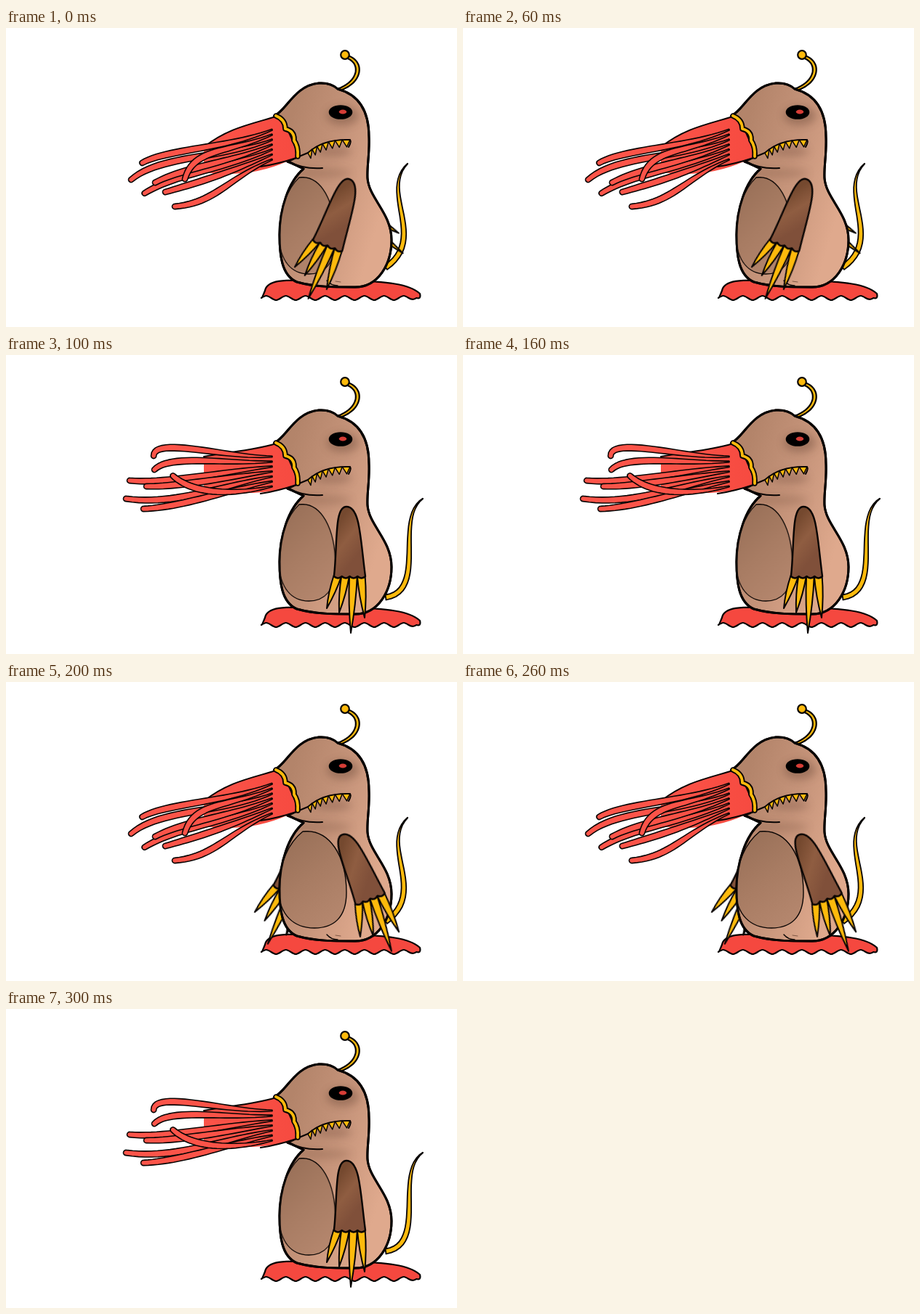
Write an HTML page that moves like this. It is 620 px wide and 412 px high and loops after 400 ms.

```html
<!DOCTYPE html>
<html lang="en">
<head>
<meta charset="utf-8">
<title>Tentacled creature</title>
<style>
  html, body { margin: 0; width: 100%; height: 100%; overflow: hidden; background: #fff; }
  svg { display: block; width: 620px; height: 412px; }
</style>
</head>
<body>
<svg id="stage" viewBox="0 0 620 412" stroke-linejoin="round" stroke-linecap="round"></svg>
<script>
const STEP = 100;
const INK = "#080403", GOLD = "#fdba0c";

const lerp = (a, b, t) => a + (b - a) * t;
const range = n => [...Array(n).keys()];
const path = (d, fill, width = 2, stroke = INK) =>
  `<path d="${d}" fill="${fill}" stroke="${stroke}" stroke-width="${width}"/>`;
const line = (d, width = 1.6, stroke = INK) => path(d, "none", width, stroke);

// Point on a cubic Bézier curve.
function bezier(curve, t) {
  const s = 1 - t, weights = [s * s * s, 3 * s * s * t, 3 * s * t * t, t * t * t];
  return [0, 1].map(k => weights.reduce((sum, w, i) => sum + w * curve[i][k], 0));
}

// Closed outline around a curve; half-width runs from a to b with a bulge between.
function tube(curve, fill, a, b, bulge, width = 1.8) {
  const n = 24;
  const side = sign => range(n + 1).map(i => {
    const t = i / n, [x, y] = bezier(curve, t);
    const [px, py] = bezier(curve, t - 0.01), [qx, qy] = bezier(curve, t + 0.01);
    const w = sign * (lerp(a, b, t) + bulge * Math.sin(Math.PI * t)) / Math.hypot(qx - px, qy - py);
    return [x - (qy - py) * w, y + (qx - px) * w].map(v => v.toFixed(1));
  });
  const start = side(1), back = side(-1).reverse();
  return path(`M${start.join("L")}L${back.join("L")}A${a},${a} 0 0 0 ${start[0]}Z`, fill, width);
}

const shade = (cx, cy, rx, ry, color, opacity) =>
  `<ellipse cx="${cx}" cy="${cy}" rx="${rx}" ry="${ry}" fill="${color}" opacity="${opacity}" filter="url(#soft)"/>`;
const gradient = (id, x1, y1, x2, y2, ...colors) =>
  `<linearGradient id="${id}" gradientUnits="userSpaceOnUse" x1="${x1}" y1="${y1}" x2="${x2}" y2="${y2}">` +
  colors.map((c, i) => `<stop offset="${i / (colors.length - 1)}" stop-color="${c}"/>`).join("") + "</linearGradient>";

// Pattern holds one digit per step: 1 shows the group.
const when = (pattern, ...parts) => `<g data-show="${pattern}">${parts.join("")}</g>`;

const bodyShape = `M369,121C386,113 397,79 430,76C445,75 452,80 456,84C486,92 499,116 499,150
  C500,175 496,190 497,207C499,235 530,255 530,292C530,325 512,357 480,357
  C450,357 425,357 400,350C378,341 376,310 376,285C376,250 388,212 409,194
  C400,190 395,187 387,184L402,177 384,135Z`;

const defs = `<defs>
  ${gradient("skin", 375, 180, 525, 225, "#b3846a", "#c6947a", "#dfa98d")}
  ${gradient("pouch", 380, 220, 460, 320, "#997058", "#a87c63", "#b4866d")}
  ${gradient("sleeve", -18, 20, 20, 50, "#75492f", "#8f5d41", "#80503a")}
  ${gradient("flesh", 165, 0, 402, 0, "#fd554a", "#fb5348", "#f64a40")}
  <filter id="soft" x="-60%" y="-200%" width="220%" height="500%"><feGaussianBlur stdDeviation="6"/></filter>
  <clipPath id="inside"><path d="${bodyShape}"/></clipPath>
</defs>`;

const ripples = range(16).map(i => `S${560 - 13.5 * i},${i % 2 ? 368 : 376} ${553.5 - 13.5 * i},372`).join("");
const puddle = path(`M356,362C360,342 400,349 450,348C530,348 556,354 569,366
  Q571,374 564,372${ripples}Q352,372 356,362Z`, "#f5483f", 2.2);

const tail = curve => tube(curve, GOLD, 0.3, 3.5, 1);
const tailIn = tail([[552, 187], [513, 225], [580, 290], [522, 330]]);
const tailOut = tail([[573, 198], [533, 225], [580, 325], [522, 334]]);

const antenna = tube([[457, 85], [488, 75], [492, 46], [467, 39]], GOLD, 1.5, 1.8, 0.8, 2.2)
  + `<circle cx="466" cy="37" r="5.8" fill="${GOLD}" stroke="${INK}" stroke-width="2.2"/>`;

// One arm, hanging straight down from the shoulder at the local origin.
const CLAW_TIPS = [[-30, 134], [-13, 140], [3, 168], [22, 147]];
const CUFF = 10.75;
const claw = ([tx, ty], i) => {
  const left = CUFF * (i - 1.9), right = left + CUFF, lean = (tx - (left + right) / 2) / 2, bend = lerp(89, ty, 0.5);
  return path(`M${left},89Q${left + lean},${bend} ${tx},${ty}Q${right + lean},${bend} ${right},89Z`, GOLD);
};
const armShape = CLAW_TIPS.map(claw).join("")
  + path(`M-20,89C-15,45 -20,-6 -3,-6C16,-6 16,38 23,90${`q${-CUFF / 2},5 ${-CUFF},0`.repeat(4)}Z`, "url(#sleeve)", 2.4);
const arm = (x, y, angle) => `<g transform="translate(${x} ${y}) rotate(${angle})">${armShape}</g>`;

const body = path(bodyShape, "url(#skin)", 3)
  + `<g clip-path="url(#inside)">
    ${shade(463, 121, 22, 13, "#664435", 0.4)}
    ${shade(450, 170, 25, 6, "#74503f", 0.4)}
    ${shade(435, 200, 40, 6, "#79523f", 0.3)}
  </g>`;

const pouchShape = path(`M408,206C445,202 468,240 468,290C468,325 450,339 424,339
  C396,339 376,322 374,285Q378,230 408,206Z`, "url(#pouch)", 1.4);
const pouch = squeeze => `<g clip-path="url(#inside)">
  <g transform="translate(378 0) scale(${squeeze} 1) translate(-378 0)">${pouchShape}</g></g>`;
const outline = line(bodyShape, 3);
const crease = line("M441,348Q447,355 456,355", 1.4) + line("M453,349L460,350", 1, "#7d5745");

const mouth = [[415, 172], [428, 160], [447, 153], [473, 154]];
const TEETH = 7;
const teeth = range(TEETH).map(i => {
  const [a, tip, b] = [0, 0.5, 1].map(k => bezier(mouth, (i + k) / TEETH));
  return path(`M${a}L${tip[0] + 1},${tip[1] + 10} ${b}`, GOLD, 1.5);
}).join("");
const face = line("M387,184Q410,195 435,193", 2) + line("M403,177L415,172", 2) + teeth
  + line(`M${mouth[0]}C${mouth.slice(1).join(" ")}Q475,157 471,164`, 2)
  + `<ellipse cx="460" cy="116" rx="16.3" ry="9.8" fill="#000"/>`
  + `<ellipse cx="463" cy="115.5" rx="5.2" ry="3" fill="#d63d36"/>`;

// Tentacles run from a tip, past a bend and a shared hub, to evenly spaced roots.
// The shorter ones lie on top.
function beard({ brow, hub, ends }) {
  const [top, bottom] = hub;
  const edge = `M371,122C335,133 305,${brow} 272,${top - 2}`;
  const curves = ends.map(([tip, bend], i) => {
    const u = i / (ends.length - 1);
    return [tip, bend, [305, lerp(top, bottom, u)], [366, lerp(140, 181, u)]];
  });
  return path(`${edge}L272,${bottom - 8}Q335,${bottom} 386,184L402,177 384,135Z`, "url(#flesh)", 0)
    + line(edge, 2) + line("M350,191Q372,188 402,178", 2)
    + curves.sort((a, b) => a[0][0] - b[0][0]).map(c => tube(c, "url(#flesh)", 3.6, 0.8, 2, 1.6)).join("");
}
const droop = beard({
  brow: 138, hub: [166, 207],
  ends: [[[187, 186], [220, 167]], [[246, 208], [258, 165]], [[172, 209], [212, 174]], [[205, 213], [245, 192]],
    [[190, 228], [236, 199]], [[219, 226], [268, 212]], [[232, 246], [288, 241]]],
});
const spread = beard({
  brow: 133, hub: [142, 195],
  ends: [[[203, 139], [203, 112]], [[204, 158], [225, 136]], [[170, 173], [225, 178]], [[193, 181], [235, 182]],
    [[165, 198], [235, 208]], [[189, 212], [240, 210]], [[229, 166], [255, 190]]],
});

const collarLine = "M371,121Q384,126 384,139Q397,142 396,155Q402,163 401,177";
const collar = line(collarLine, 7.5) + line(collarLine, 3.8, GOLD);

const stage = document.getElementById("stage");
stage.innerHTML = [
  defs, puddle,
  when("1010", tailIn),
  when("0101", tailOut),
  when("1000", arm(408, 214, -54)),
  when("0010", arm(420, 204, 22)),
  antenna, body,
  when("1101", pouch(0.83)),
  when("0010", pouch(1)),
  outline,
  when("1010", crease),
  face,
  when("1010", droop),
  when("0101", spread),
  collar,
  when("1000", arm(473, 215, 21)),
  when("0101", arm(471, 215, 0)),
  when("0010", arm(467, 215, -21)),
].join("");

for (const group of stage.querySelectorAll("[data-show]")) {
  const shown = [...group.dataset.show];
  const frames = [...shown, shown[0]].map((opacity, i) =>
    ({ opacity, offset: i / shown.length, easing: "step-end" }));
  group.animate(frames, { duration: STEP * shown.length, iterations: Infinity });
}
</script>
</body>
</html>
```
